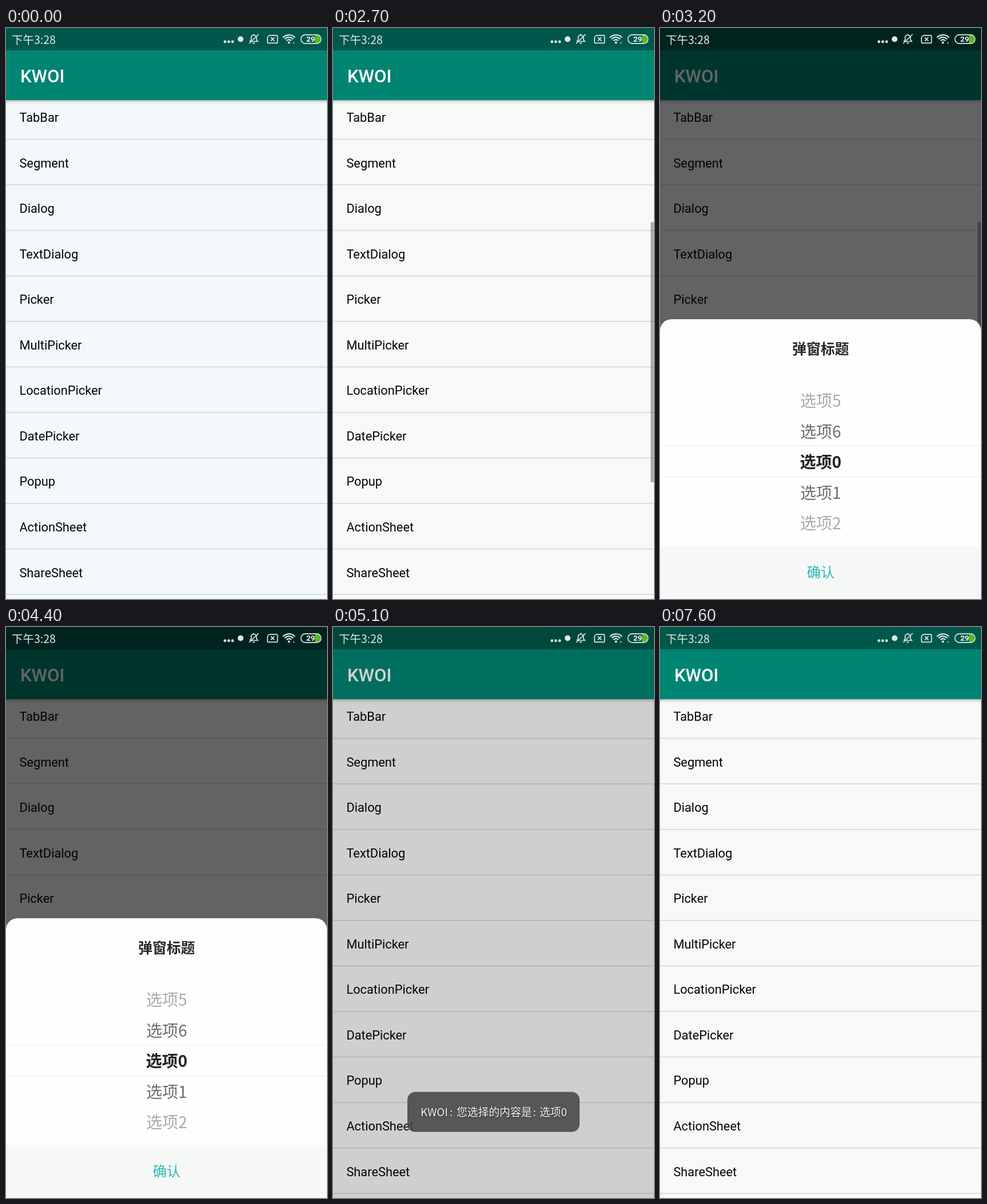
Animation, 561 px wide and 998 px high, one loop 8000 ms. Source, as an HTML page with a canvas:

```html
<!DOCTYPE html>
<html lang="zh-CN">
<head>
<meta charset="utf-8">
<title>Picker demo</title>
<style>
  html, body { margin: 0; width: 100%; height: 100%; overflow: hidden; background: #f7f9f7; }
  canvas { display: block; }
</style>
</head>
<body>
<canvas id="stage" width="561" height="998"></canvas>
<script>
const W = 561, H = 998, LOOP = 8000, STEP = 100;
const ctx = document.getElementById('stage').getContext('2d');
const LATIN = 'Roboto, "Noto Sans CJK SC", sans-serif';
const HAN = '"Noto Sans CJK SC", "Noto Sans CJK", sans-serif';
const ROWS = ['TabBar', 'Segment', 'Dialog', 'TextDialog', 'Picker', 'MultiPicker',
  'LocationPicker', 'DatePicker', 'Popup', 'ActionSheet', 'ShareSheet'];
const ROW_HEIGHT = 79.55;
const SHEET_TOP = 509;
const ICON = '#dfebe8';

const clamp = v => Math.max(0, Math.min(1, v));
const span = (t, from, to) => clamp((t - from) / (to - from));
const easeOut = u => 1 - (1 - u) ** 3;
const easeInOut = u => u < .5 ? 2 * u * u : 1 - 2 * (1 - u) ** 2;

function rect(x, y, w, h, color) {
  ctx.fillStyle = color;
  ctx.fillRect(x, y, w, h);
}

function rounded(x, y, w, h, r) {
  ctx.beginPath();
  ctx.roundRect(x, y, w, h, r);
}

function text(str, x, y, font, color, align = 'left') {
  ctx.font = font;
  ctx.fillStyle = color;
  ctx.textAlign = align;
  ctx.fillText(str, x, y);
}

function centered(str, middle, size, color, weight = 400) {
  text(str, 280.7, middle + size * .37, `${weight} ${size}px ${HAN}`, color, 'center');
}

function line(...points) {
  ctx.beginPath();
  points.forEach(([x, y]) => ctx.lineTo(x, y));
  ctx.stroke();
}

function dot(x, y, r) {
  ctx.beginPath();
  ctx.arc(x, y, r, 0, Math.PI * 2);
  ctx.fill();
}

function drawList(t) {
  const early = t < 2700, mixed = t < 2800;
  rect(0, 0, W, H, early ? '#f3f8fb' : mixed ? '#f7f9f9' : '#f7f9f7');
  ROWS.forEach((name, i) => {
    const y = i * ROW_HEIGHT;
    text(name, 23.4, 164 + y, `21.8px ${LATIN}`, '#050505');
    rect(0, 193.9 + y, W, 1.5, early ? '#d0d5d7' : '#d4d7d5');
  });
  if (t >= 2700 && t < 4400) rect(555, 339.5, 6, 454.5, 'rgba(0,0,0,.3)');
}

function drawHeader() {
  const shadow = ctx.createLinearGradient(0, 126, 0, 133);
  shadow.addColorStop(0, 'rgba(0,0,0,.28)');
  shadow.addColorStop(.4, 'rgba(0,0,0,.09)');
  shadow.addColorStop(1, 'rgba(0,0,0,0)');
  rect(0, 126, W, 7, shadow);
  rect(0, 0, W, 39, '#00574b');
  rect(0, 39, W, 87, '#008573');
  text('KWOI', 24.9, 95.3, `500 31.2px ${LATIN}`, '#fff');
}

function drawBell() {
  ctx.lineWidth = 1.7;
  line([426, 23.5], [428.5, 20.5], [428.5, 17]);
  ctx.beginPath();
  ctx.arc(433, 17, 4.7, Math.PI, 0);
  ctx.lineTo(437.7, 20.5);
  ctx.lineTo(440, 23.5);
  ctx.lineTo(426, 23.5);
  ctx.stroke();
  line([433, 10.5], [433, 12]);
  line([431, 26.5], [435, 26.5]);
  line([425, 27], [441.5, 11]);
}

function drawWifi(t) {
  ctx.lineWidth = 2.2;
  for (const r of [14, 9.8, 5.6]) {
    ctx.beginPath();
    ctx.arc(494.5, 26, r, -Math.PI * .77, -Math.PI * .23);
    ctx.stroke();
  }
  dot(494.5, 25.5, 2);
  ctx.lineWidth = 1.2;
  if (t >= 5600 && t < 7600) {
    line([501.3, 26], [503, 24], [504.7, 26]);
    line([501.3, 27], [503, 29], [504.7, 27]);
  } else {
    line([503, 24.5], [503, 28]);
  }
}

function drawStatus(t) {
  text('下午3:28', 10, 27.5, `19.5px ${HAN}`, ICON);
  ctx.fillStyle = ctx.strokeStyle = ICON;
  [382.7, 389.3, 396].forEach(x => dot(x, 24, 2.4));
  dot(410, 19.5, 5);
  drawBell();
  ctx.lineWidth = 1.7;
  rounded(457, 12.8, 17.5, 13.6, [5, 2, 2, 2]);
  ctx.stroke();
  line([462.8, 16.4], [469, 22.6]);
  line([469, 16.4], [462.8, 22.6]);
  drawWifi(t);
  ctx.save();
  rounded(516.5, 12.8, 33, 13.4, 6.7);
  ctx.clip();
  rect(540, 12, 11, 16, '#55bd1c');
  ctx.restore();
  rounded(515.4, 11.9, 35.2, 15.2, 7.6);
  ctx.lineWidth = 1.6;
  ctx.stroke();
  text('29', 532.5, 24.2, `700 13.5px ${LATIN}`, '#f2f7f5', 'center');
}

function drawSheet(t) {
  const enter = easeOut(span(t, 2820, 3200));
  const leave = easeInOut(span(t, 4550, 4980));
  const shown = enter * (1 - leave);
  if (shown <= 0) return;
  ctx.save();
  ctx.globalAlpha = enter < 1 ? clamp(enter * 1.3) : 1 - leave ** 2;
  ctx.translate(0, (1 - shown) * (H - SHEET_TOP));
  ctx.fillStyle = '#fdfffd';
  rounded(0, SHEET_TOP, W, H - SHEET_TOP, [20, 20, 0, 0]);
  ctx.fill();
  centered('弹窗标题', 561, 24.8, '#292b2a', 700);
  rect(0, 730, W, 1, '#e9ebe9');
  rect(0, 784, W, 1, '#e9ebe9');
  [5, 6, 0, 1, 2].forEach((n, i) => {
    const distance = Math.abs(i - 2);
    centered('选项' + n, 652 + i * 53.5, 28, ['#222423', '#6b6d6c', '#a8aaa9'][distance],
      distance ? 400 : 700);
  });
  rect(0, 905, W, 93, '#f6f8f7');
  centered('确认', 951, 24.3, '#2bb9b8');
  ctx.restore();
}

function drawToast(t) {
  const alpha = span(t, 4900, 5100) * (1 - span(t, 6720, 7000));
  if (alpha <= 0) return;
  const top = 812.5 + 15.5 * span(t, 5200, 5400);
  ctx.save();
  ctx.globalAlpha = alpha;
  ctx.fillStyle = 'rgba(71,72,70,.88)';
  rounded(130, top, 301, 70, 14);
  ctx.fill();
  ctx.shadowColor = 'rgba(0,0,0,.6)';
  ctx.shadowBlur = 3;
  ctx.shadowOffsetY = 1;
  const parts = [['KWOI', 153], [':', 204], ['您选择的内容是', 216], [':', 349.5], ['选项0', 361]];
  for (const [str, x] of parts) text(str, x, top + 42.5, `300 18.8px ${HAN}`, '#f5f6f5');
  ctx.restore();
}

function draw(now) {
  const t = Math.floor(now % LOOP / STEP) * STEP;
  drawList(t);
  drawHeader();
  const dim = .6 * span(t, 2720, 2980) * (1 - span(t, 4970, 5151));
  rect(0, 0, W, H, `rgba(0,0,0,${dim})`);
  drawStatus(t);
  drawSheet(t);
  drawToast(t);
}

const start = performance.now();
function tick() {
  draw(performance.now() - start);
  requestAnimationFrame(tick);
}
tick();
</script>
</body>
</html>
```
